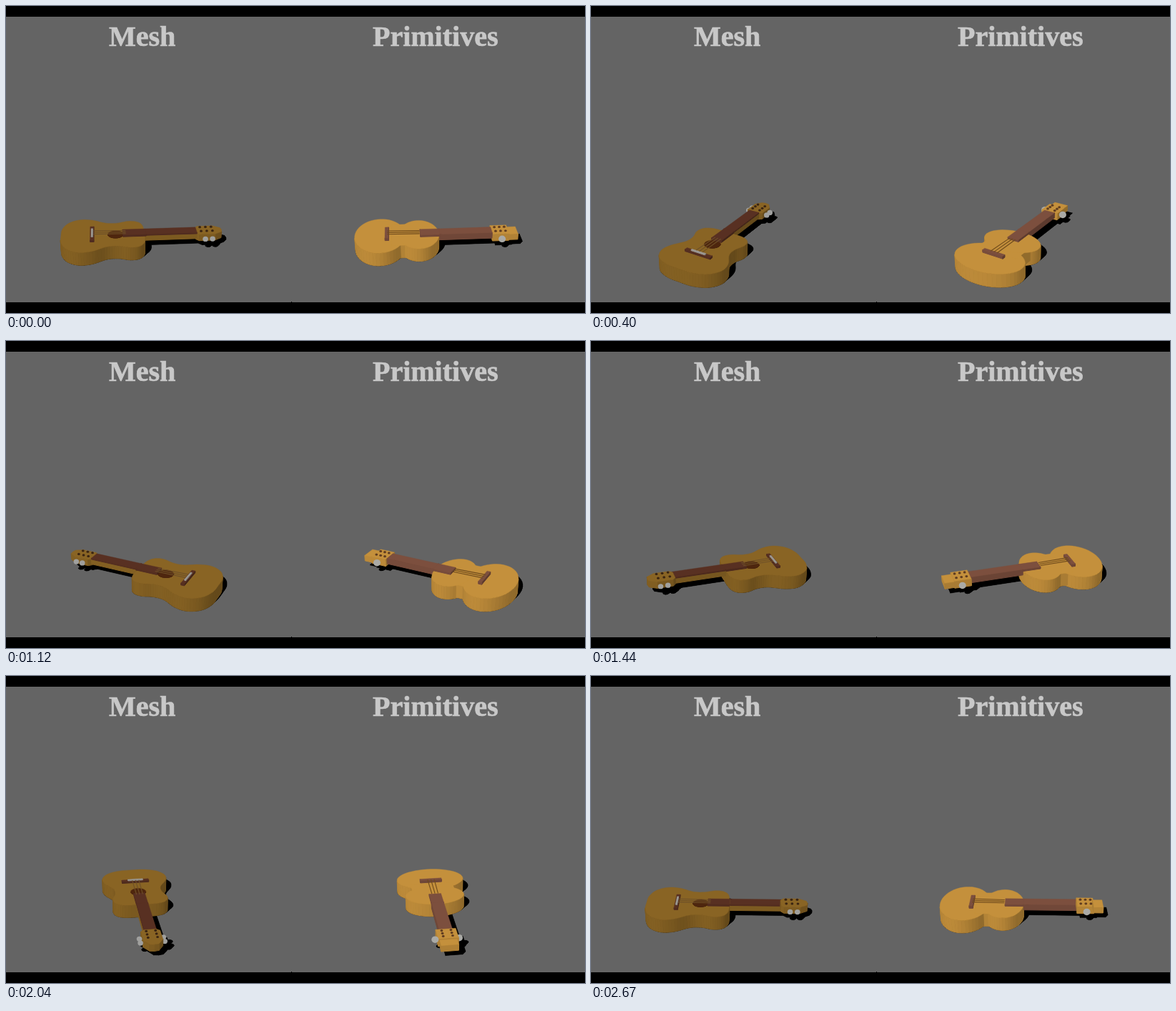
Recreate the animation shown at these times as an HTML page with a canvas. Size 810 by 430 pixels, loop 2.73 s.

```html
<!DOCTYPE html>
<html lang="en">
<head>
<meta charset="utf-8">
<title>Guitars</title>
<style>
html, body { margin: 0; width: 100%; height: 100%; overflow: hidden; background: #000; }
#stage { position: relative; width: 810px; height: 430px; }
#stage > * { position: absolute; left: 0; top: 0; display: block; }
text {
  font: bold 40px "Liberation Serif", "Times New Roman", serif;
  fill: #c8c8c8; stroke: #c8c8c8; stroke-width: 0.7px;
}
</style>
</head>
<body>
<div id="stage">
  <canvas id="view" width="810" height="430"></canvas>
  <svg width="810" height="430">
    <text x="144" y="56">Mesh</text>
    <text x="513" y="56">Primitives</text>
  </svg>
</div>
<script>
const ctx = document.getElementById('view').getContext('2d');
const LOOP = 2730, STEP = 40, POSES = 67, LAST = 2670;
const TOP = 20, AXIS_Y = 318.5, DIST = 800, SIN = 0.47, COS = 0.86;
const LIGHT = [-0.62, -0.78], CAST = [0.45, 0.75];

let cx = 0, slide = 0, ca = 1, sa = 0;

// Guitar space: s along the neck, w across, z up. World: x right, d away.
const world = (s, w) => [(s + slide) * ca - w * sa, (s + slide) * sa + w * ca];

function screen([x, d], z) {
  const h = z - TOP, m = DIST / (DIST + d * COS - h * SIN);
  return [cx + x * m, AXIS_Y - (d * SIN + h * COS) * m];
}
const project = (s, w, z) => screen(world(s, w), z);

// Shapes are counter-clockwise outlines seen from above.
const box = (s0, s1, h) => [[s0, -h], [s1, -h], [s1, h], [s0, h]];

const ellipse = (c, a, b, n = 48) => Array.from({ length: n }, (_, i) => {
  const t = i / n * 2 * Math.PI;
  return [c + a * Math.cos(t), b * Math.sin(t)];
});

const mirror = half => half.map(([s, w]) => [s, -w])
  .concat(half.filter(p => p[1] > 0).reverse());

function smooth(pts, n = 5) {
  const at = i => pts[(i + pts.length) % pts.length], out = [];
  pts.forEach((_, i) => {
    const q = [at(i - 1), at(i), at(i + 1), at(i + 2)];
    for (let j = 0; j < n; j++) {
      const t = j / n;
      out.push([0, 1].map(k => {
        const [a, b, c, d] = q.map(p => p[k]);
        return b + t * (c - a + t * (2 * a - 5 * b + 4 * c - d + t * (3 * (b - c) + d - a))) / 2;
      }));
    }
  });
  return out;
}

const solid = (shape, z0, z1, color) => ({ shape, z0, z1, color });

const rgb = (c, k = 1) => `rgb(${c.map(v => Math.round(v * k))})`;

function poly(pts, color, seam = 0) {
  ctx.beginPath();
  pts.forEach(p => ctx.lineTo(p[0], p[1]));
  ctx.closePath();
  ctx.fillStyle = color;
  ctx.fill();
  if (seam) {
    ctx.strokeStyle = color;
    ctx.lineWidth = seam;
    ctx.stroke();
  }
}

function drawShadow({ shape, z0, z1 }) {
  const cast = z => shape.map(([s, w]) => {
    const [x, d] = world(s, w);
    return screen([x + CAST[0] * z, d + CAST[1] * z], 0);
  });
  const low = cast(z0), high = cast(z1);
  poly(low, '#000');
  poly(high, '#000');
  low.forEach((p, i) => {
    const j = (i + 1) % low.length;
    poly([p, low[j], high[j], high[i]], '#000', 0.5);
  });
}

function drawSolids(parts) {
  const faces = [];
  for (const { shape, z0, z1, color } of parts) {
    const pts = shape.map(p => world(...p));
    pts.forEach((a, i) => {
      const b = pts[(i + 1) % pts.length];
      const dx = b[0] - a[0], dd = b[1] - a[1], len = Math.hypot(dx, dd) || 1;
      const quad = [screen(a, z1), screen(b, z1), screen(b, z0), screen(a, z0)];
      if (quad[1][0] <= quad[0][0]) return;
      const lit = Math.max(0, (dd * LIGHT[0] - dx * LIGHT[1]) / len);
      faces.push({ quad, depth: a[1] + b[1], color: rgb(color, 0.74 + 0.22 * lit) });
    });
  }
  faces.sort((a, b) => b.depth - a.depth).forEach(f => poly(f.quad, f.color, 1));
  for (const { shape, z1, color } of parts) {
    poly(shape.map(p => project(...p, z1)), rgb(color), 0.4);
  }
}

function dot(s, w, z, r, color, flat = 1) {
  const [x, y] = project(s, w, z);
  ctx.beginPath();
  ctx.ellipse(x, y, r, r * flat, 0, 0, 2 * Math.PI);
  ctx.fillStyle = color;
  ctx.fill();
}

function drawStrings(g) {
  ctx.strokeStyle = g.string;
  ctx.lineWidth = 1.1;
  for (const w of [-5, 0, 5]) {
    ctx.beginPath();
    ctx.moveTo(...project(-72, w, 24));
    ctx.lineTo(...project(-27, w * 0.9, 23));
    ctx.stroke();
  }
}

function drawHead(g) {
  const knobs = side => g.knobs.forEach(s => dot(s, side * 15.5, 16, g.knobSize, g.knob, 0.95));
  const far = ca >= 0 ? 1 : -1;
  knobs(far);
  // The part further from the camera goes first.
  const parts = sa > 0 ? [...g.head].reverse() : g.head;
  parts.forEach(p => drawSolids([p]));
  for (const s of g.posts) for (const w of [-6, 6]) dot(s, w, 24, 1.9, g.post, 0.85);
  knobs(-far);
}

function drawGuitar(g) {
  cx = g.cx;
  slide = g.slide;
  [...g.body, ...g.neck, ...g.head].forEach(drawShadow);
  for (const s of g.knobs) for (const side of [-1, 1]) {
    drawShadow({ shape: ellipse(s, 4, 4, 10).map(([a, b]) => [a, b + side * 15.5]), z0: 12, z1: 20 });
  }
  const body = () => {
    drawSolids(g.body);
    [...g.inlay, ...g.bridge, g.board].forEach(p => drawSolids([p]));
    drawStrings(g);
  };
  const neck = () => g.neck.forEach(p => drawSolids([p]));
  if (sa > 0) {
    drawHead(g);
    neck();
    body();
  } else {
    body();
    neck();
    drawHead(g);
  }
}

const oak = [137, 100, 36], walnut = [88, 48, 34];
const pine = [196, 144, 60], cedar = [124, 79, 62];

const mesh = {
  cx: 190, slide: 4.5,
  body: [solid(smooth(mirror([[-117, 0], [-116, 20], [-108, 38], [-92, 48], [-74, 46],
    [-54, 35], [-38, 34], [-22, 39], [-9, 36], [-2, 24], [-1, 0]])), 0, TOP, oak)],
  inlay: [solid(ellipse(-41, 11, 11, 24), TOP, TOP, [78, 38, 14])],
  bridge: [solid(box(-76.5, -71.5, 20), TOP, 23, walnut), solid(box(-75, -73, 11), 23, 24.5, [160, 156, 150])],
  board: solid(box(-31, 1, 8), TOP, 23, walnut),
  neck: [solid(box(0, 72, 8), 13, 21, oak), solid(box(0, 72, 8), 21, 23, walnut)],
  head: [solid(mirror([[71, 0], [71, 8], [75, 12.5], [97, 12.5], [107, 6], [108, 0]]), 12, 22, oak)],
  posts: [78, 86, 94], post: '#3a2412',
  knobs: [83, 93], knobSize: 3.8, knob: '#a0a09e',
  string: '#6e5028'
};

const prims = {
  cx: 603.5, slide: 2,
  body: [solid(ellipse(-82, 35, 50), 0, TOP, pine), solid(box(-66, -32, 31), 0, TOP, pine),
    solid(ellipse(-28, 28, 42), 0, TOP, pine)],
  inlay: [],
  bridge: [solid(box(-75, -70, 16), TOP, 24, cedar)],
  board: solid(box(-26, 1, 8.5), TOP, 23, cedar),
  neck: [solid(box(0, 74, 8.5), 14, 23, cedar)],
  head: [solid(box(74, 97, 13), 12, 23, pine), solid(box(97, 110, 11), 12, 21, pine)],
  posts: [79, 86, 93], post: '#5f3c20',
  knobs: [87], knobSize: 5, knob: '#aaaaa6',
  string: '#6e4a1c'
};

function draw(pose) {
  const a = (4 + pose * 360 / POSES) * Math.PI / 180;
  ca = Math.cos(a);
  sa = Math.sin(a);
  ctx.fillStyle = '#000';
  ctx.fillRect(0, 0, 810, 430);
  ctx.fillStyle = '#646464';
  ctx.fillRect(0, 15, 810, 400);
  ctx.fillStyle = '#000';
  ctx.fillRect(399, 414, 1, 1);
  drawGuitar(mesh);
  drawGuitar(prims);
}

const start = performance.now();
let shown = -1;

function tick() {
  const t = Math.max(0, performance.now() - start) % LOOP;
  const pose = t >= LAST ? POSES - 1 : Math.min(POSES - 2, Math.floor(t / STEP));
  if (pose !== shown) draw(shown = pose);
  requestAnimationFrame(tick);
}
tick();
</script>
</body>
</html>
```
